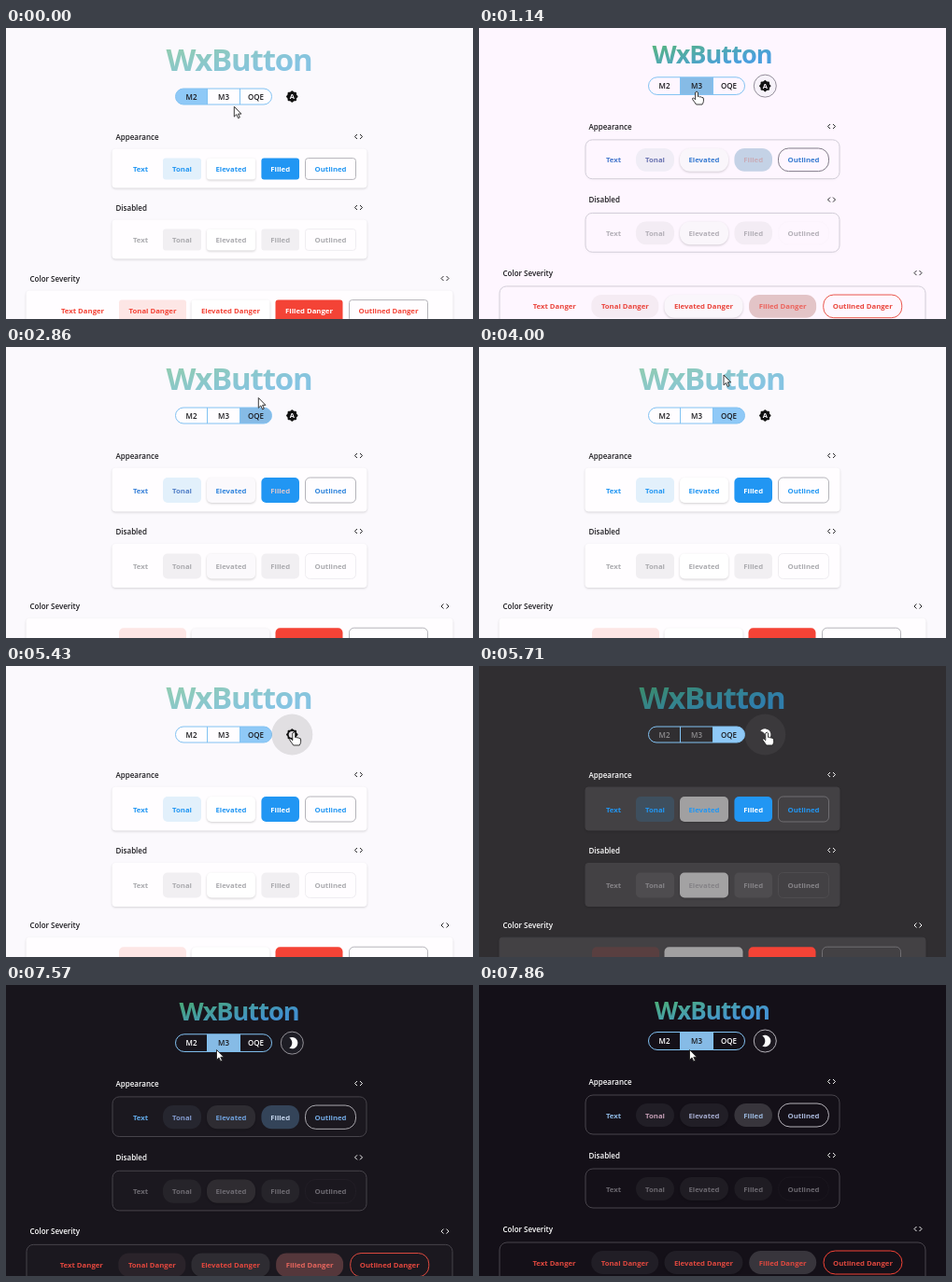
Recreate the animation shown at these times as an HTML page. Size 500 px wide and 312 px high, loop 8 s.

```html
<!DOCTYPE html>
<html lang="en">
<head>
<meta charset="utf-8">
<title>WxButton</title>
<style>
html, body { margin: 0; width: 100%; height: 100%; overflow: hidden; }
svg { display: block; width: 500px; height: 312px; font: 600 8px "Open Sans", "Noto Sans", sans-serif; }
</style>
</head>
<body>
<svg id="stage" viewBox="0 0 500 312"></svg>
<script>
const STEP = 1000 / 7, LOOP = 8000;
const blue = '#2196f3', red = '#f44336', white = '#ffffff';

// Vertical layouts: label and card positions, button height and corner radius
const flat = {
  title: 33, base: 46, seg: 73.5, segH: 17, labels: [116.5, 192.5, 268.5], cards: [130, 206, 282],
  cardH: 41, pad: 9.6, btnH: 22.8, rad: 3, cardRad: 3, ring: 0, shadow: 1, spread: 1
};
const tall = { ...flat, labels: [116.5, 197.5, 278], cards: [130, 211.5, 291.2], cardH: 46, pad: 10, btnH: 27, rad: 5 };
const round = {
  ...flat, title: 26, base: 37, seg: 60, segH: 19, labels: [103.5, 182.5, 261.5], cards: [118, 197, 276],
  cardH: 42, pad: 9, btnH: 25, rad: 12.5, cardRad: 8, ring: 1, shadow: 0, spread: 1.009
};

const light = {
  bg: '#fbf9fd', card: '#fffdff', cardLine: '#fffdff', ink: '#1c1b1f', icon: '#111111',
  top: '#90ccb0', bottom: '#86c4e2', segBg: '#fffdff', segInk: '#1c1b1f', elev: white, elevOff: white,
  text: [blue, blue, blue, white, blue], tonal: '#e2f0fb', fill: blue, line: '#b5b4ba',
  offText: '#ababaf', off: '#f1eff2', offLine: '#efedf1',
  dText: [red, red, red, white, red], dTonal: '#fde6e5', dFill: red, dLine: '#b5b4ba'
};
const dark = {
  ...light, bg: '#302e31', card: '#434144', cardLine: '#434144', ink: white, icon: white,
  top: '#3b8c6a', bottom: '#2f7dab', segBg: '#302e31', segInk: white, elev: '#424043', elevOff: '#464447',
  tonal: '#3e4f5e', line: '#706e72', offText: '#858387', off: '#4e4c4f', offLine: '#4e4c4f',
  dTonal: '#593f40', dLine: '#706e72'
};
const lightRound = {
  ...light, bg: '#fef5ff', card: '#fef5ff', cardLine: '#c9c3cf', top: '#4db076', bottom: '#3f98dc',
  segBg: '#fef5ff', elev: '#f4edf7', elevOff: '#f4edf7',
  text: ['#6a58a6', '#b3526f', '#5062b0', '#93586f', '#4a60ae'], tonal: '#f3ecf5', fill: '#e2dde4', line: '#77717f',
  offText: '#b5b0b8', off: '#f3ecf4', offLine: '#fef5ff',
  dText: Array(5).fill('#e8473f'), dTonal: '#f3ecf5', dFill: '#e0dce2', dLine: red
};
const darkRound = {
  ...dark, bg: '#141018', card: '#141018', cardLine: '#48454c', top: '#4cae78', bottom: '#4494d4',
  segBg: '#141018', elev: '#211e26', elevOff: '#1f1c23',
  text: ['#8fb9e4', '#c39db4', '#a3a9cc', '#9bb8de', '#a9b7da'], tonal: '#211e26', fill: '#38353c', line: '#b4b1b8',
  offText: '#6a676e', off: '#1f1c23', offLine: '#1a161e',
  dText: Array(5).fill('#e0483f'), dTonal: '#211e26', dFill: '#38353c', dLine: red
};
const looks = [{ ...flat, ...light }, { ...round, ...lightRound }, { ...tall, ...light },
  { ...tall, ...dark }, { ...round, ...darkRound }];

// Theme switches: start step, length, length for the slower parts
const switches = [[5, 4, 6], [16, 4, 6], [38, 2, 4], [50, 4, 5]];
const slow = ['elev', 'elevOff', 'segInk', 'text'];

// Pointer: step, x, y, 1 = hand
const path = [
  [0, 244.3, 84.3, 0], [4, 233, 70, 1], [10, 233, 67, 0], [12, 237, 64, 0], [13, 257.5, 60, 1], [15, 270.3, 54.5, 1],
  [18, 270.3, 54.5, 0], [24, 270.3, 54.5, 0], [26, 244, 58, 0], [28, 262, 30, 0], [30, 285, 45, 0], [32, 303, 70, 1],
  [34, 308.2, 71, 1], [45, 308.2, 71, 1], [46, 282, 40, 0], [47, 232, 28, 0], [48, 200, 66, 1], [49, 238.5, 72, 1],
  [50, 238.5, 72, 1], [53, 225.5, 69.5, 0], [56, 225.5, 69.5, 0]
];
const arrow = 'M0 0V10.8L2.5 8.4L4.3 12.4L6 11.6L4.3 7.8H7.6Z';
const hand = 'M-1.4 1Q0-1 1.4 1V5.5Q2.8 4.6 3.6 6Q5 5.2 5.7 6.6Q7.4 6 7.4 8V10.5Q7 12.5 6 14H-.5Q-2.5 11-4.2 8.8Q-5 7.2-3.8 7Q-3 6.8-1.4 8.8Z';

const clamp = v => Math.max(0, Math.min(1, v));
const ease = v => v * v * (3 - 2 * v);
const hex = c => [1, 3, 5].map(i => parseInt(c.slice(i, i + 2), 16));

function mix(a, b, p) {
  if (Array.isArray(a)) return a.map((v, i) => mix(v, b[i], p));
  if (typeof a === 'number') return a + (b - a) * p;
  const to = hex(b);
  return '#' + hex(a).map((v, i) => Math.round(mix(v, to[i], p)).toString(16).padStart(2, '0')).join('');
}

function lookAt(k) {
  const n = switches.findLastIndex(s => k >= s[0]);
  if (n < 0) return looks[0];
  const [start, fast, late] = switches[n], from = looks[n], to = looks[n + 1], look = {};
  for (const key in from) {
    const p = slow.includes(key) ? clamp((k - start) / late) : ease(clamp((k - start) / fast));
    look[key] = mix(from[key], to[key], p);
  }
  return look;
}

const text = (s, x, y, fill, anchor = 'middle', more = '') =>
  `<text x="${x}" y="${y}" fill="${fill}" text-anchor="${anchor}" ${more}>${s}</text>`;
const box = (x, y, w, h, r, fill, line = 'none', more = '') =>
  `<rect x="${x}" y="${y}" width="${w}" height="${h}" rx="${r}" fill="${fill}" stroke="${line}" ${more}/>`;
const drop = a => `style="filter:drop-shadow(0 1px .8px rgba(0,0,0,${a}))"`;

const names = ['Text', 'Tonal', 'Elevated', 'Filled', 'Outlined'];
const shortRow = [[144, 36], [188.5, 41], [241, 52], [293.7, 40.6], [347.5, 54]];
const longRow = [[82, 64], [157, 72], [240.5, 84], [324.5, 72], [409.5, 84]];

function section(L, i) {
  const wide = i === 2, x = wide ? 22 : 114, w = wide ? 456 : 272;
  const label = ['Appearance', 'Disabled', 'Color Severity'][i], ly = L.labels[i], y = L.cards[i];
  const tone = [L.tonal, L.off, L.dTonal][i], fill = [L.fill, L.off, L.dFill][i];
  const line = [L.line, L.offLine, L.dLine][i], elev = i === 1 ? L.elevOff : L.elev;
  const inks = [L.text, Array(5).fill(L.offText), L.dText][i];
  const h = L.btnH, top = y + L.pad, cx = wide ? 470 : 377.5;
  let out = text(label, x + 3.5, ly + 3, L.ink, 'start');
  out += `<path d="M${cx - 1.5} ${ly - 2.5}l-2.5 2.5l2.5 2.5m3 -5l2.5 2.5l-2.5 2.5" fill="none" stroke="${L.ink}" stroke-width=".95"/>`;
  out += box(x, y, w, wide ? 80 : L.cardH, L.cardRad, L.card, L.cardLine, drop(.15 * L.shadow));
  names.forEach((name, n) => {
    let [bx, bw] = (wide ? longRow : shortRow)[n];
    if (wide) bx = 246 + (bx - 246) * L.spread;
    const face = ['none', tone, elev, fill, L.card][n];
    out += box(bx - bw / 2, top, bw, h, L.rad, face, n === 4 ? line : 'none', n === 2 ? drop(.18) : '');
    out += text(wide ? name + ' Danger' : name, bx, top + h / 2 + 3, inks[n], 'middle', 'font-size="7.75" font-weight="700"');
  });
  return out;
}

function segments(L, k) {
  const sel = k < 6 ? 0 : k < 17 ? 1 : k < 51 ? 2 : 1;
  const hover = k >= 4 && k < 13 ? 1 : k >= 13 && k < 25 ? 2 : k >= 49 ? 1 : -1;
  const y = L.seg - L.segH / 2, xs = [181.5, 215.5, 250.5, 284.5];
  let out = `<clipPath id="pill">${box(181.5, y, 103, L.segH, L.segH / 2, white)}</clipPath><g clip-path="url(#pill)">`;
  for (let i = 0; i < 3; i++) {
    const w = xs[i + 1] - xs[i];
    out += box(xs[i], y, w, L.segH, 0, i === sel ? '#8fc9f7' : L.segBg);
    if (i === hover) out += box(xs[i], y, w, L.segH, 0, i === sel ? '#1c1b1f' : L.segInk, 'none', 'fill-opacity=".08"');
  }
  out += '</g>' + box(181.5, y, 103, L.segH, L.segH / 2, 'none', '#82c2f2');
  out += `<path d="M215.5 ${y}v${L.segH}M250.5 ${y}v${L.segH}" stroke="#82c2f2"/>`;
  ['M2', 'M3', 'OQE'].forEach((s, i) =>
    out += text(s, (xs[i] + xs[i + 1]) / 2, L.seg + 3, i === sel ? '#1c1b1f' : L.segInk));
  return out;
}

function modeIcon(L, k) {
  let out = `<g transform="translate(306.3 ${L.seg})">`;
  if (k >= 31 && k < 46)
    out += `<circle r="22" fill="${L.icon}" fill-opacity="${k === 37 || k === 38 ? .11 : .05}"/>`;
  out += `<circle r="12" fill="${L.tonal}" fill-opacity="${L.ring * .6}" stroke="${L.line}" stroke-opacity="${L.ring}"/>`;
  if (k < 39) {
    const sq = box(-4.7, -4.7, 9.4, 9.4, 1, L.icon);
    out += sq + `<g transform="rotate(45)">${sq}</g>`;
    out += k < 37 ? text('A', 0, 2.7, L.bg, 'middle', 'font-size="7.5" font-weight="700"') : `<circle r="3.6" fill="#e0dde1"/>`;
  } else {
    const turn = -40 * (1 - clamp((k - 38) / 5));
    out += `<path transform="rotate(${turn})" d="M-3-5.5A6.2 6.2 0 1 1-3 5.5A6.5 6.5 0 0 0-3-5.5Z" fill="${L.icon}"/>`;
  }
  return out + '</g>';
}

function pointer(k) {
  const n = path.findLastIndex(p => k >= p[0]), a = path[n], b = path[n + 1];
  const [, x, y] = mix(a, b, (k - a[0]) / (b[0] - a[0]));
  return `<path transform="translate(${x} ${y})" d="${a[3] ? hand : arrow}" fill="#fff" stroke="#222" stroke-width=".9" stroke-linejoin="round"/>`;
}

function draw(k) {
  const L = lookAt(k);
  return `<linearGradient id="tint" y1=".1" x2=".7" y2=".9"><stop offset=".1" stop-color="${L.top}"/><stop offset=".9" stop-color="${L.bottom}"/></linearGradient>`
    + box(0, 0, 500, 312, 0, L.bg)
    + text('WxButton', 249.5, L.base, 'url(#tint)', 'middle', `font-size="${L.title}" font-weight="700" letter-spacing="-.036em"`)
    + segments(L, k) + modeIcon(L, k) + [0, 1, 2].map(i => section(L, i)).join('') + pointer(k);
}

const stage = document.getElementById('stage');
let shown = -1;
function tick() {
  const k = Math.floor((performance.now() % LOOP + 5) / STEP) % 56;
  if (k !== shown) stage.innerHTML = draw(shown = k);
  requestAnimationFrame(tick);
}
tick();
</script>
</body>
</html>
```
